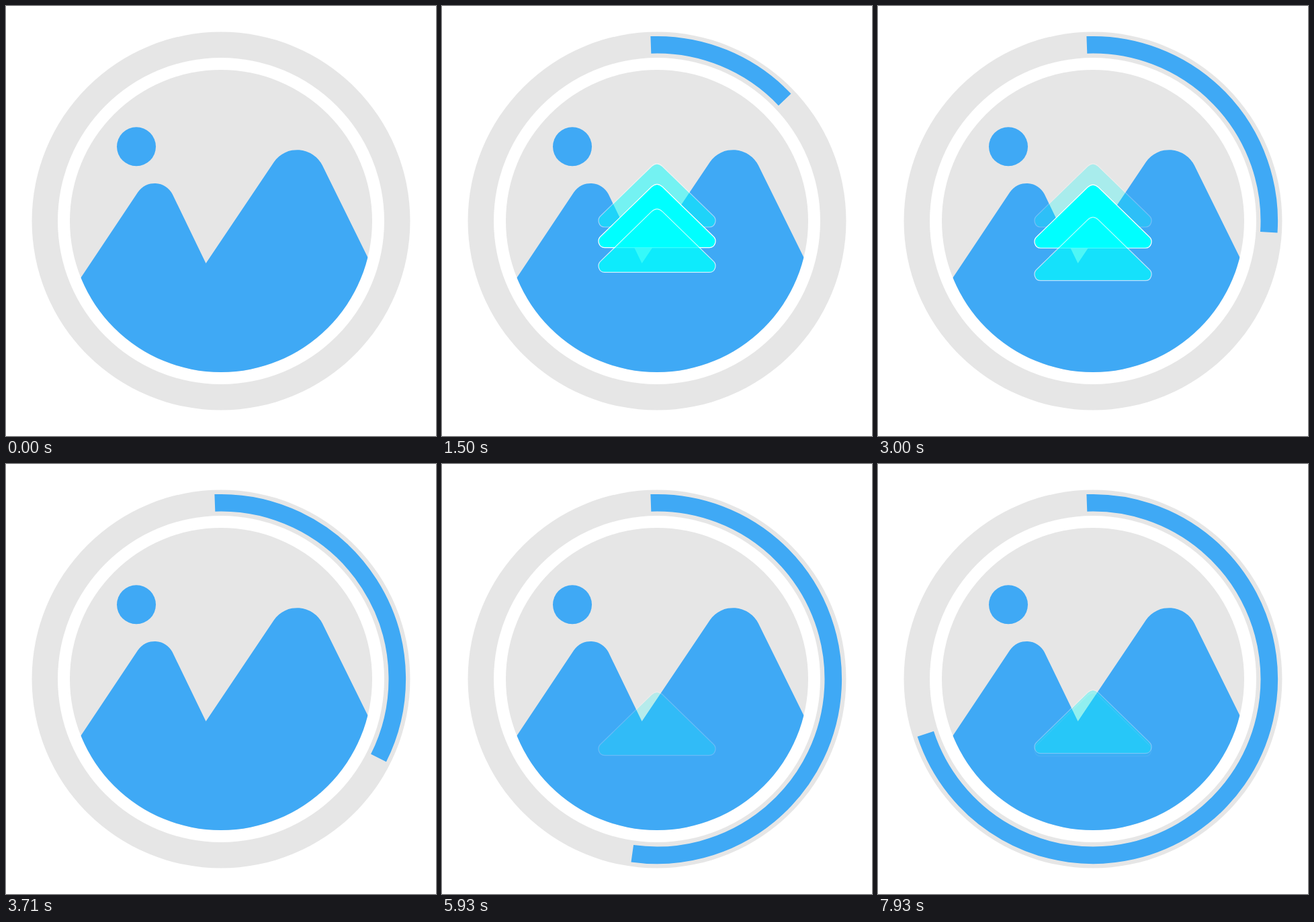
Recreate the animation shown at these times as an HTML page. Size 640 px wide and 640 px high, loop 8000 ms.

```html
<!DOCTYPE html>
<html lang="en">
<head>
<meta charset="utf-8">
<title>Image upload progress</title>
<style>
  html, body { margin: 0; width: 100%; height: 100%; overflow: hidden; background: #fff; }
  svg { display: block; width: 100vw; height: 100vh; }
</style>
</head>
<body>
<svg viewBox="0 0 640 640">
  <defs>
    <clipPath id="disc"><circle cx="320" cy="320" r="225"/></clipPath>
    <path id="arrow" d="M242 0C233.5 0 229.8-11 236.5-17L312-90.5Q320-98 328-90.5L403.5-17C410.2-11 406.5 0 398 0Z"
      fill="#0ff" stroke="#fff" stroke-width="1.2"/>
  </defs>
  <circle cx="320" cy="320" r="281.5" fill="#e6e6e6"/>
  <circle cx="320" cy="320" r="243" fill="#fff"/>
  <circle cx="320" cy="320" r="225" fill="#e6e6e6"/>
  <g fill="#3fa9f5" clip-path="url(#disc)">
    <circle cx="194" cy="209.3" r="29"/>
    <path d="M90 436.5L196.2 277.2A30 30 0 0 1 247.7 280L297.5 383L399 232A42 42 0 0 1 470.8 237.1L560 418V560H90Z"/>
  </g>
  <path id="ring" fill="none" stroke="#3fa9f5" stroke-width="25.6"/>
  <use class="arrow" href="#arrow"/>
  <use class="arrow" href="#arrow"/>
  <use class="arrow" href="#arrow"/>
</svg>
<script>
const LOOP = 8000, FPS = 14;
const TICK = 40, TICK_DEG = 1.2755, RING_R = 262.3, RING_FROM = -2;
const WAVE = 1900, STAGGER = 250, RISE = 955, FIRST_RISE = 1400, FADE = 197;
const LOW = 435, TRAVEL = 106;

const ring = document.getElementById('ring');
const arrows = [...document.querySelectorAll('.arrow')];

function ringPoint(deg) {
  const a = deg * Math.PI / 180;
  return (320 + RING_R * Math.sin(a)).toFixed(2) + ' ' + (320 - RING_R * Math.cos(a)).toFixed(2);
}

function drawRing(t) {
  const sweep = Math.ceil(t / TICK - 1e-6) * TICK_DEG;
  ring.setAttribute('d', sweep > 0
    ? `M${ringPoint(RING_FROM)}A${RING_R} ${RING_R} 0 ${sweep > 180 ? 1 : 0} 1 ${ringPoint(RING_FROM + sweep)}`
    : '');
}

// Cubic rise while fading in, then a quick fade at the top.
function drawArrow(el, t, delay) {
  const s = t - delay;
  const wave = Math.floor(s / WAVE);
  const u = s - wave * WAVE;
  const rise = wave < 1 ? FIRST_RISE : RISE;
  const k = Math.min(1, u / rise);
  let alpha = 0;
  if (s > 0) {
    alpha = u < rise
      ? Math.min(1, 1.15 * Math.pow(k, 1.2))
      : Math.max(0, 1 - (u - rise) / FADE);
  }
  el.setAttribute('transform', `translate(0 ${(LOW - TRAVEL * k ** 3).toFixed(2)})`);
  el.setAttribute('opacity', alpha.toFixed(3));
}

function draw(ms) {
  const step = Math.floor((ms + 5) * FPS / 1000) % (LOOP * FPS / 1000);
  const t = step * 1000 / FPS;
  drawRing(t);
  arrows.forEach((el, i) => drawArrow(el, t, i * STAGGER));
}

let start;
function frame(now) {
  start ??= now;
  draw((now - start) % LOOP);
  requestAnimationFrame(frame);
}
draw(0);
requestAnimationFrame(frame);
</script>
</body>
</html>
```
